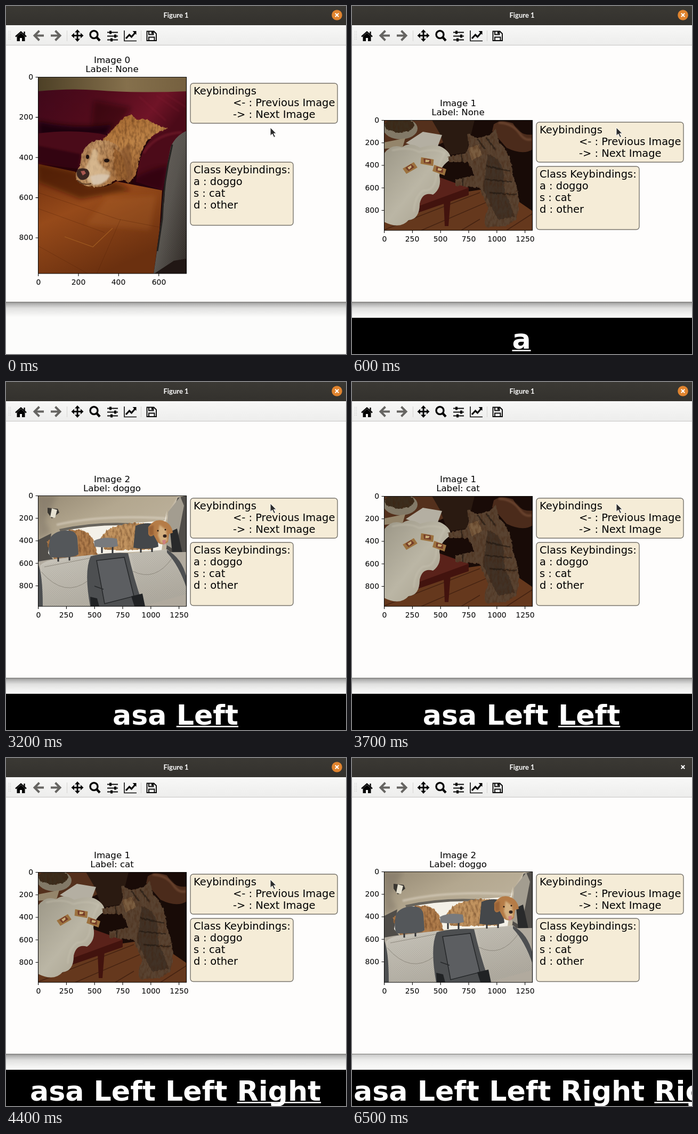
These frames come from a looping animation (638x653 px, 6700 ms). An HTML page:

```html
<!DOCTYPE html>
<html lang="en">
<head>
<meta charset="utf-8">
<title>Image labelling</title>
<style>
html, body { margin: 0; width: 100%; height: 100%; overflow: hidden; background: #fcfcfb; }
svg { display: block; width: 638px; height: 653px; }
text { font-family: "DejaVu Sans", sans-serif; }
.tick { font-size: 13.9px; }
.title { font-size: 16.67px; text-anchor: middle; }
.note { font-size: 19.44px; }
#keys { font-size: 52.2px; font-weight: bold; fill: #fff; }
.line { fill: none; stroke: #080808; }
</style>
</head>
<body>
<svg viewBox="0 0 638 653">
<defs>
  <linearGradient id="bar" x2="0" y2="1"><stop stop-color="#3b3934"/><stop offset="1" stop-color="#33312d"/></linearGradient>
  <linearGradient id="tools" x2="0" y2="1"><stop stop-color="#f8f8f7"/><stop offset="1" stop-color="#ededec"/></linearGradient>
  <linearGradient id="shade" x2="0" y2="1"><stop stop-color="#000" stop-opacity=".4"/><stop offset=".15" stop-color="#000" stop-opacity=".26"/><stop offset=".4" stop-color="#000" stop-opacity=".11"/><stop offset="1" stop-color="#000" stop-opacity="0"/></linearGradient>
  <linearGradient id="wall"><stop stop-color="#4d4026"/><stop offset=".6" stop-color="#85704c"/><stop offset="1" stop-color="#75603f"/></linearGradient>
  <linearGradient id="sofa" x2="1" y2=".3"><stop stop-color="#40081a"/><stop offset=".45" stop-color="#520b1b"/><stop offset=".8" stop-color="#701427"/><stop offset="1" stop-color="#4b0a18"/></linearGradient>
  <linearGradient id="wood" x2=".5" y2="1"><stop stop-color="#6d2d0d"/><stop offset=".45" stop-color="#964a1a"/><stop offset="1" stop-color="#6b300f"/></linearGradient>
  <linearGradient id="fur" x2=".3" y2="1"><stop stop-color="#a4672f"/><stop offset=".5" stop-color="#bd8347"/><stop offset="1" stop-color="#9c6334"/></linearGradient>
  <linearGradient id="face" x2="1" y2=".3"><stop stop-color="#a8754a"/><stop offset=".45" stop-color="#c69a6a"/><stop offset="1" stop-color="#a56d3b"/></linearGradient>
  <linearGradient id="chair" x2="1" y2="1"><stop stop-color="#6a655e"/><stop offset=".5" stop-color="#57534e"/><stop offset="1" stop-color="#2c2622"/></linearGradient>
  <linearGradient id="plate" x2="1" y2="1"><stop stop-color="#9c9787"/><stop offset=".5" stop-color="#bbb6a5"/><stop offset="1" stop-color="#a39c89"/></linearGradient>
  <linearGradient id="roof" x2=".7" y2="1"><stop stop-color="#968a74"/><stop offset=".3" stop-color="#b3a78f"/><stop offset="1" stop-color="#c9bfac"/></linearGradient>
  <linearGradient id="seat" x2=".6" y2="1"><stop stop-color="#cbc7bd"/><stop offset="1" stop-color="#b0aba0"/></linearGradient>
  <filter id="rough" x="-10%" y="-10%" width="120%" height="120%" color-interpolation-filters="sRGB">
    <feTurbulence type="fractalNoise" baseFrequency=".22 .1" numOctaves="3" seed="4" result="noise"/>
    <feDisplacementMap in="SourceGraphic" in2="noise" scale="5" xChannelSelector="R" yChannelSelector="G" result="shape"/>
    <feColorMatrix in="noise" values="0 0 0 0 .25  0 0 0 0 .12  0 0 0 0 .04  1 0 0 0 -.4" result="spots"/>
    <feComposite in="spots" in2="shape" operator="in" result="mottle"/>
    <feMerge><feMergeNode in="shape"/><feMergeNode in="mottle"/></feMerge>
  </filter>
  <filter id="soft"><feGaussianBlur stdDeviation="5"/></filter>
  <filter id="blend" x="-20%" y="-20%" width="140%" height="140%"><feGaussianBlur stdDeviation="1.8"/></filter>
  <pattern id="weave" width="4" height="4" patternUnits="userSpaceOnUse"><path d="M0 1H2M2 3H4" stroke="#6e6a63" stroke-opacity=".2"/></pattern>
  <clipPath id="tall"><path d="M60.5 133.5H338.5V502H60.5Z"/></clipPath>
  <clipPath id="wide"><path d="M60.5 214H338.5V421H60.5Z"/></clipPath>
</defs>

<!-- window -->
<rect id="shadow" y="556" width="638" height="28" fill="url(#shade)"/>
<path fill="#fefdfc" d="M0 74H638V555H0Z"/>
<path fill="#777673" d="M0 555H638V556H0Z"/>
<path fill="url(#bar)" d="M0 0H638V36H0Z"/>
<path fill="url(#tools)" d="M0 36H638V73H0Z"/>
<path fill="#c5c4c2" d="M0 73H638V74H0Z"/>
<text x="319" y="21.5" text-anchor="middle" fill="#fff" style="font:bold 13px Lato,sans-serif">Figure 1</text>
<circle id="close" cx="621" cy="17" r="9.8" fill="#e0842f"/>
<path d="M617.8 13.8l6.4 6.4m0-6.4l-6.4 6.4" stroke="#fff" stroke-width="2"/>

<!-- toolbar -->
<path d="M5.5 47V65M8.5 47V65" stroke="#bbb" stroke-dasharray="1 2"/>
<path d="M114.5 46V66M253.5 46V66" stroke="#d5d4d2"/>
<path d="M28 50.5L20.5 57V66H26V60H30V66H35.5V57Z"/>
<path class="line" d="M18 57.5L28 48.5L38 57.5M34.5 48V54" stroke-width="2.4"/>
<g class="line" style="stroke:#666562" stroke-width="4">
  <path d="M62.5 46.5L53.5 55.5L62.5 64.5M55 55.5H71"/>
  <path d="M92.5 46.5L101.5 55.5L92.5 64.5M100 55.5H84"/>
</g>
<path class="line" d="M134 48V63.5M126 55.5H142" stroke-width="3"/>
<path d="M134 44l5 5.5h-10zM134 67l5-5.5h-10zM122.5 55.5l5.5-5v10zM145.5 55.5l-5.5-5v10z"/>
<circle class="line" cx="165" cy="53.5" r="7" stroke-width="3.4"/>
<path class="line" d="M170 58.5L176 65" stroke-width="4.5"/>
<path class="line" d="M190 49.5H210M190 56.5H210M190 63.5H210" stroke-width="2"/>
<path d="M194 46.5h4v6h-4zM203 53.5h4v6h-4zM196 60.5h4v6h-4z"/>
<path class="line" d="M222 46V65.5H245" stroke-width="1.6"/>
<path class="line" d="M225 61L231.5 54L235.5 58L242 50.5" stroke-width="3.2"/>
<path d="M237.5 47H244.5V54Z"/>
<path class="line" d="M264.5 47.5H277.5L282 52V65H264.5ZM268 48V53.5H276.5V48M268 65V58.5H278.5V65" stroke-width="1.9"/>
<path d="M273 48h2.5v4h-2.5z"/>

<!-- sofa photo -->
<g class="photo" clip-path="url(#tall)">
  <path fill="#220509" d="M60 133H339V503H60Z"/>
  <path fill="url(#wall)" d="M60 133H339V166L60 160Z"/>
  <path fill="url(#sofa)" d="M60 160Q120 154 170 158Q250 164 339 160V270L240 240L60 240Z"/>
  <g filter="url(#soft)" fill="#1e0309">
    <path d="M60 216Q130 232 200 222L190 244L60 246Z"/>
    <path d="M165 178L235 190L205 235L160 225Z" opacity=".4"/>
  </g>
  <path fill="none" stroke="#8c2438" stroke-width="2" opacity=".35" d="M282 168L325 198M300 166L338 190M250 170L300 215" filter="url(#blend)"/>
  <path fill="#4a0b19" d="M60 239Q130 230 190 242L170 310L60 296Z"/>
  <path fill="#28060c" d="M60 262L140 278L135 312L60 295Z" opacity=".6" filter="url(#blend)"/>
  <path fill="#4c0b19" d="M244 330Q250 265 280 242Q303 228 339 233L310 270L294 346Z"/>
  <path fill="#2b050d" d="M236 325Q272 305 303 300L294 348L240 335Z" opacity=".7" filter="url(#soft)"/>
  <path fill="none" stroke="#741a2c" stroke-width="5" opacity=".6" d="M258 276Q280 240 330 237" filter="url(#blend)"/>
  <path fill="url(#wood)" d="M60 296L130 311Q145 336 165 339Q190 342 207 329L293 346L288 420L277 503H60Z"/>
  <g filter="url(#soft)">
    <path fill="#3f1607" opacity=".6" d="M60 297L130 311L155 338L205 330L235 345L140 362L60 330Z"/>
    <path fill="#c07736" opacity=".22" d="M190 360L282 355L270 420L150 410Z"/>
  </g>
  <path fill="none" stroke="#b56f28" stroke-width="1.2" opacity=".6" d="M110 433L163 452L200 417"/>
  <path fill="none" stroke="#512007" opacity=".35" d="M60 350L210 400L288 415M60 380L185 425M60 450L155 503M215 400L170 503"/>
  <g filter="url(#rough)">
    <path fill="url(#fur)" d="M182 250L200 232L222 208L235 204L245 213Q270 210 280 222L303 230L280 240Q258 255 252 280L243 318L230 333L190 300Z"/>
    <path fill="url(#face)" d="M142 278Q150 256 172 252Q204 250 217 272Q231 300 227 322Q216 332 205 326Q185 343 163 339Q142 337 132 326Q128 312 139 300Z"/>
    <path fill="#9a6332" d="M203 266Q230 285 228 320Q221 332 210 325Q199 300 203 266Z"/>
  </g>
  <g filter="url(#blend)">
    <path fill="#7c4d26" opacity=".55" d="M216 272L232 255L238 320L229 330Z"/>
    <path fill="#dcc09a" opacity=".75" d="M163 268Q177 268 171 288Q180 304 196 312Q194 328 176 335Q158 338 152 326L150 302Q158 288 163 268Z"/>
    <path fill="#d9c9b4" opacity=".8" d="M158 320Q178 312 196 318Q186 336 163 336Z"/>
    <path fill="#6d4526" opacity=".6" d="M181 288Q190 282 199 291Q190 299 181 288ZM148 281Q154 277 159 285Q153 293 148 281Z"/>
  </g>
  <path fill="#3b2621" d="M133 308Q141 302 152 306Q159 312 155 320Q149 328 140 326Q131 321 133 308Z"/>
  <path fill="#a85850" d="M140 310l7-1 3 5-6 4z"/>
  <ellipse cx="189" cy="290" rx="5" ry="3.5" fill="#20120e"/><ellipse cx="153" cy="283" rx="3" ry="4" fill="#20120e"/>
  <path fill="none" stroke="#5d3d26" stroke-width="2" d="M134 327Q145 338 160 333"/>
  <path fill="url(#chair)" d="M339 234Q317 244 309 265Q299 310 297 365L288 425L277 503H339Z"/>
  <path fill="url(#weave)" d="M339 234Q317 244 309 265Q299 310 297 365L288 425L277 503H339Z"/>
  <path fill="#211714" d="M277 503L315 478L339 474V503Z"/>
  <path fill="none" stroke="#242220" stroke-width="3" d="M312 260Q295 330 293 400L284 460"/>
</g>

<!-- table photo -->
<g class="photo" clip-path="url(#wide)">
  <path fill="#190b07" d="M60 213H339V422H60Z"/>
  <path fill="#54301c" d="M60 213H190L180 252L130 275H60Z"/>
  <path fill="#2a1a11" d="M150 214H230L215 275L180 280L165 240Z"/>
  <path fill="#65381d" d="M205 350L339 330V422H60V405L120 380Z"/>
  <path fill="none" stroke="#381b0d" stroke-width="1.5" opacity=".7" d="M60 420L240 350M130 421L260 365M205 421L240 400M290 421L338 390"/>
  <path fill="#180b07" d="M280 260L339 250V385L310 365Z"/>
  <path fill="#5a221a" d="M160 320L219 341V354L115 387L130 354Z"/>
  <path fill="#42130e" d="M219 341V355L115 391L118 378ZM172 367L185 363L181 413H174Z"/>
  <ellipse cx="91" cy="230" rx="32" ry="20" fill="#827967"/>
  <g filter="url(#rough)"><ellipse cx="89" cy="224" rx="28" ry="13" fill="#3b2d1d"/></g>
  <path fill="#94856b" d="M60 256L100 248L95 265L60 268Z"/>
  <path fill="#b4afa2" d="M101 257L133 236L169 242L161 263L128 268Z"/>
  <path fill="url(#plate)" d="M60 277Q74 258 94 265Q108 254 128 266Q154 257 169 265Q186 275 185 288Q166 300 164 318Q169 342 152 354Q132 348 127 371Q127 400 106 402Q90 420 60 405Z"/>
  <path fill="none" stroke="#d0cbba" stroke-width="2" opacity=".5" d="M75 271Q108 263 126 274Q155 266 174 276Q160 298 157 327Q151 348 134 346Q117 358 116 386" filter="url(#blend)"/>
  <g id="snacks"></g>
  <path fill="#4b2b1b" d="M266 222Q278 212 302 220Q316 245 339 241V269Q321 281 290 266L263 235Z"/>
  <path fill="none" stroke="#795039" stroke-width="4" opacity=".7" d="M275 219Q302 220 315 240Q325 254 337 250" filter="url(#blend)"/>
  <g filter="url(#rough)" fill="#594331">
    <path d="M219 262L216 239L235 248L258 242L270 230L276 256Q300 277 301 315Q320 360 309 400L292 412L252 416Q244 402 256 380L239 341L193 337L194 325L229 318L218 293L184 293L178 283L214 276Z"/>
    <path fill="#382b21" d="M254 278Q290 285 285 345L306 395L274 401L246 345Z" opacity=".7"/>
    <path fill="#826445" opacity=".8" d="M218 268L237 260L244 280L225 290Z"/>
    <path fill="none" stroke="#1c1410" stroke-width="3" opacity=".6" d="M235 250L250 268M252 248L270 270M252 300L298 310M250 325L300 330M258 350L308 354M205 278L208 293M208 323L207 338"/>
  </g>
</g>

<!-- car photo -->
<g class="photo" clip-path="url(#wide)">
  <path fill="url(#roof)" d="M60 213H339V422H60Z"/>
  <path fill="#736b5e" d="M60 213H95L73 260L85 283L60 295Z" opacity=".4" filter="url(#soft)"/>
  <path fill="none" stroke="#ded5c6" stroke-width="4" opacity=".6" d="M95 268Q180 248 302 256L325 214" filter="url(#blend)"/>
  <path fill="#f4f1e8" d="M91 288Q107 275 146 272L298 260L302 241L292 316L70 328Z"/>
  <path fill="#68645c" d="M100 276Q173 260 250 266L249 270Q172 265 102 281Z"/>
  <path fill="#504d49" d="M61 338V296L85 284L79 321L92 337ZM298 333L308 260L322 217L339 213V360Z"/>
  <path fill="#a39d90" d="M304 244L327 215L334 232L318 316L300 305Z"/>
  <path fill="#292a2b" d="M308 281L321 275L333 330L313 331Z"/>
  <path fill="#393631" d="M78 236l19 2 3 7-14 11-8-11z"/><path fill="#e6e1d1" d="M86 237l10 3-4 15-9-2z"/>
  <g filter="url(#rough)">
    <path fill="#b07d4c" d="M76 300Q112 269 148 280Q168 290 173 334H90Z"/>
    <path fill="#c1935f" d="M178 293Q187 271 220 268Q258 259 272 270L276 315H184Z"/>
  </g>
  <path fill="#b1aa9e" d="M60 337Q150 320 338 319V422H60Z"/>
  <path fill="url(#seat)" d="M64 344Q75 333 102 332L163 324Q148 355 158 421H67ZM229 322L302 314Q326 330 339 378V398L255 421Q239 365 229 322Z"/>
  <path fill="url(#weave)" d="M67 344L163 325L158 421H67ZM235 322L302 316L339 382V398L255 421Z"/>
  <path fill="none" stroke="#8d887d" d="M66 356Q110 407 155 372M238 355Q280 376 312 330M72 347L160 330"/>
  <path fill="#4d4f51" d="M60 341Q69 360 69 422H60ZM159 327Q190 319 229 321Q240 370 258 421H158Q146 355 159 327ZM302 315Q330 330 339 367V387Q325 345 302 320Z"/>
  <path fill="#5c5e61" d="M170 335L222 329L240 402L185 416Z"/>
  <path fill="none" stroke="#27292b" stroke-width="1.6" d="M170 335L222 329L240 402L185 416ZM166 383L183 389"/>
  <path fill="#202224" d="M235 402L256 397L261 421H241ZM158 403L171 406L175 421H159Z"/>
  <path fill="none" stroke="#333437" stroke-width="3" d="M98 328V337M119 327V335M180 308V321M200 308V321M253 310V320M274 310V319"/>
  <path fill="#54575a" d="M83 292Q94 277 119 279Q132 280 134 294L136 323Q128 331 84 329Q77 319 83 292Z"/>
  <path fill="#787a7d" d="M165 298Q182 289 208 294L210 308Q194 312 166 309Z"/>
  <path fill="#44474a" d="M243 270Q262 262 281 267L286 309Q266 316 239 311Z"/>
  <path fill="#b57c47" d="M267 272Q278 256 294 260Q311 265 313 283L306 285L304 300Q293 309 284 300L277 287Q270 293 267 285Z"/>
  <g filter="url(#blend)">
    <path fill="#d4b080" d="M288 268L300 277L303 298L291 303L285 288Z"/>
    <path fill="#8d572d" opacity=".7" d="M267 273L277 268L277 287L269 288Z"/>
  </g>
  <circle cx="285" cy="279" r="1.5" fill="#22150f"/><circle cx="299" cy="277" r="1.5" fill="#22150f"/>
  <ellipse cx="298" cy="289" rx="3.5" ry="3" fill="#30221d"/>
  <path fill="#cc8081" d="M293 297l7-1-1 8-4 1z"/>
</g>

<g id="plot"></g>
<path id="pointer" d="M0 0V15.5L3.7 12L6.800 18.5L9.5 17.2L6.3 11.2H11Z" fill="#2c2c2c" stroke="#fff" stroke-linejoin="round"/>
<g id="banner">
  <path d="M0 585H638V653H0Z"/>
  <text id="keys" y="643"></text>
  <line id="underline" y1="646.5" y2="646.5" stroke="#fff" stroke-width="2.4"/>
</g>
</svg>
<script>
const LOOP = 6700;
const $ = id => document.getElementById(id);
const photos = document.querySelectorAll('.photo');

// Each track lists [start time, value].
const views = [[0, [0, 'None']], [600, [1, 'None']], [1600, [2, 'None']], [2800, [2, 'doggo']],
  [3400, [1, 'cat']], [3900, [0, 'doggo']], [4400, [1, 'cat']], [5100, [2, 'doggo']]];
const typed = [[0, null], [400, ['', '']], [500, ['', 'a']], [1400, ['a', 's']], [2400, ['as', 'a']],
  [3200, ['asa ', 'Left']], [3700, ['asa Left ', 'Left']], [4400, ['asa Left Left ', 'Right']],
  [4900, ['asa Left Left Right ', 'Right']]];
const pointers = [[0, [496, 228]], [2500, [496, 225]], [2600, [496, 222]], [2800, [496, 228]],
  [5600, [440, 179]], [5800, null]];

const at = (track, t) => track.findLast(([start]) => start <= t)[1];
const text = (cls, x, y, s, extra = '') => `<text class="${cls}" x="${x}" y="${y}" ${extra}>${s}</text>`;
const show = (el, on) => el.style.display = on ? '' : 'none';

function noteBox(y, w, h, lines) {
  const rows = lines.map(([x, s], i) => text('note', x, y + 21 + 22 * i, s)).join('');
  return `<rect x="346" y="${y}" width="${w}" height="${h}" rx="5.5" fill="#f5ecd7" stroke="#77736b" stroke-width="1.4"/>${rows}`;
}

// Labels sit on whole pixels, as the plotting library places them.
function ticks(top, bottom, scale, xStep) {
  let out = '', marks = '';
  for (let v = 0; v <= 800; v += 200) {
    const y = top + v * scale;
    marks += `M60.5 ${y}h-5`;
    out += text('tick', 51, Math.floor(y + 4.9), v, 'text-anchor="end"');
  }
  for (let v = 0; v * scale < 275; v += xStep) {
    const x = 60.6 + v * scale;
    marks += `M${x} ${bottom}v5`;
    out += text('tick', Math.round(x), bottom + 21, v, 'text-anchor="middle"');
  }
  return out + `<path class="line" stroke-width="1.1" d="${marks}M60.5 ${top}H338.5V${bottom}H60.5Z"/>`;
}

function drawPlot([index, label]) {
  const tall = index === 0;
  const top = tall ? 133.5 : index === 1 ? 214.5 : 213.5;
  photos.forEach((p, i) => show(p, i === index));
  $('plot').innerHTML =
    ticks(top, tall ? 502 : 421, tall ? .3768 : .2112, tall ? 200 : 250) +
    text('title', 199, tall ? 107 : 188, 'Image ' + index) +
    text('title', 199, tall ? 124 : 205, 'Label: ' + label) +
    noteBox(tall ? 145 : 218, 276, 75, [[352, 'Keybindings'], [426, '&lt;- : Previous Image'], [426, '-&gt; : Next Image']]) +
    noteBox(tall ? 293 : 301, 193, 118.5, [[352, 'Class Keybindings:'], [352, 'a : doggo'], [352, 's : cat'], [352, 'd : other']]);
}

function drawKeys(value) {
  show($('banner'), value);
  if (!value) return;
  const [before, last] = value, keys = $('keys');
  keys.textContent = before + last;
  show($('underline'), last);
  if (!last) return;
  const width = keys.getComputedTextLength();
  keys.setAttribute('x', width > 638 ? 3 : 318 - width / 2);
  $('underline').setAttribute('x1', keys.getStartPositionOfChar(before.length).x);
  $('underline').setAttribute('x2', keys.getEndPositionOfChar(before.length + last.length - 1).x);
}

function drawPointer(pos) {
  show($('pointer'), pos);
  if (pos) $('pointer').setAttribute('transform', `translate(${pos})`);
}

function drawFocus(active) {
  show($('close'), active);
  $('shadow').setAttribute('opacity', active ? 1 : .55);
}

$('snacks').innerHTML = [[109, 304, -25], [141, 292, 15], [164, 308, 25]].map(([x, y, r]) =>
  `<g transform="translate(${x} ${y}) rotate(${r})"><path fill="#9c713e" d="M-13-5L11-7L13 5L-11 7Z"/>` +
  '<path fill="#743b27" d="M-8-4L5-6L8 2L-5 4Z"/><path fill="#c9ad77" d="M-4-3L4-4L3 0L-3 2Z"/></g>').join('');

const drawn = new Map();
function update(draw, value) {
  if (drawn.has(draw) && drawn.get(draw) === value) return;
  drawn.set(draw, value);
  draw(value);
}

function render(now) {
  const t = now % LOOP;
  update(drawPlot, at(views, t));
  update(drawKeys, at(typed, t));
  update(drawPointer, at(pointers, t));
  update(drawFocus, t < 6500);
  requestAnimationFrame(render);
}
render(performance.now());
</script>
</body>
</html>
```
